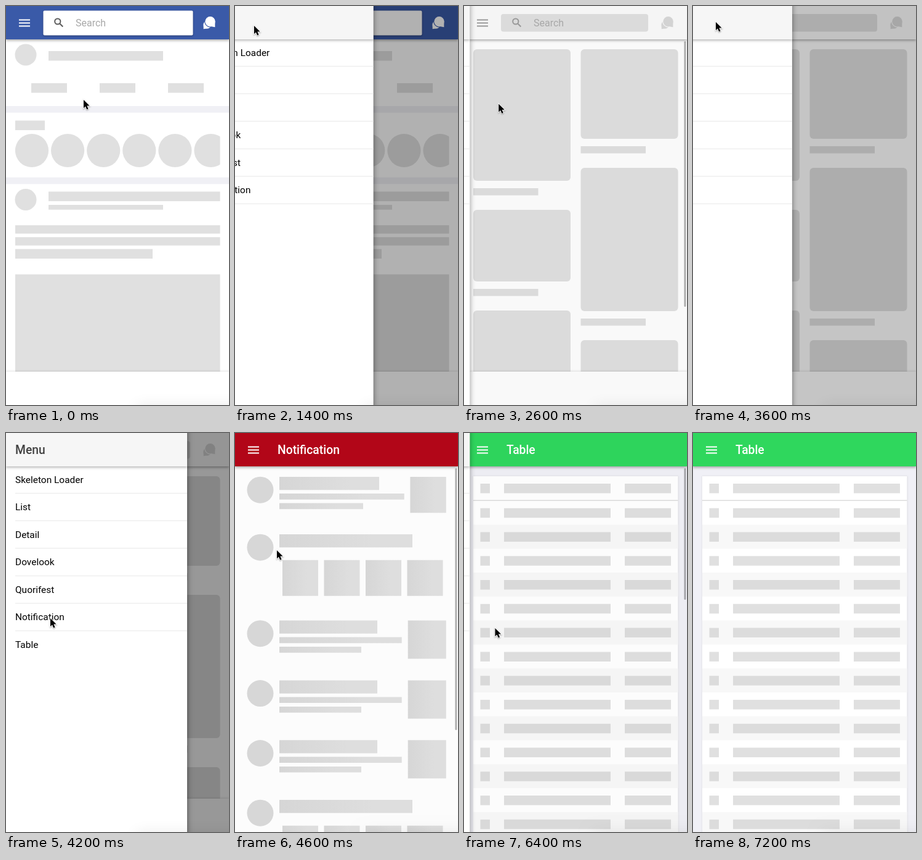
Recreate the animation shown at these times as an HTML page with a canvas. Size 362x646 px, loop 7300 ms.

```html
<!DOCTYPE html>
<html lang="en">
<head>
<meta charset="utf-8">
<title>Skeleton screens</title>
<style>
html, body { margin: 0; width: 100%; height: 100%; overflow: hidden; background: #fff; }
canvas { display: block; width: 362px; height: 646px; }
</style>
</head>
<body>
<canvas id="stage" width="362" height="646"></canvas>
<script>
const W = 362, H = 646, LOOP = 7300, STEP = 100;
const MENU_W = 294, SLIDE = 280, BONE = '#e0e0e0';
const ctx = document.getElementById('stage').getContext('2d');
const items = ['Skeleton Loader', 'List', 'Detail', 'Dovelook', 'Quorifest', 'Notification', 'Table'];

// Menu [opens, closes], and the page shown from a given time
const menuTimes = [[1293, 2350], [3535, 4310], [5320, 6150]];
const pages = [[0, feedPage], [2200, boardPage], [4400, noticePage], [6100, tablePage]];
// Scrollbar [appears, fades, bottom]
const scrollbars = [[2200, 3200, 487], [4400, 5950, 481], [6100, 6800, 270]];
// Pointer [time, x, y]
const track = [
  [0, 126, 152], [200, 160, 345], [400, 315, 210], [550, 240, 8], [800, 23, 40],
  [1000, 31, 32], [1650, 31, 32], [2100, 58, 252], [2200, 59, 250], [2300, 60, 244],
  [2700, 55, 130], [3200, 37, 28], [3600, 37, 26], [3750, 40, 60], [4000, 72, 283],
  [4200, 72, 300], [4400, 72, 300], [4600, 68, 190], [4900, 34, 30], [5500, 34, 30],
  [5800, 70, 307], [5950, 52, 338], [6300, 52, 338], [6700, 46, 250], [6900, 36, 110],
  [7000, 25, 25], [7100, 4, 20], [7200, -20, 20]
];

const clamp = p => Math.min(1, Math.max(0, p));
const easeOut = p => 1 - (1 - clamp(p)) ** 3;
const smooth = p => (p = clamp(p), p * p * (3 - 2 * p));

function rect(x, y, w, h, color = BONE, radius = 0) {
  ctx.fillStyle = color;
  ctx.beginPath();
  ctx.roundRect(x, y, w, h, radius);
  ctx.fill();
}

function circle(x, y, r, color = BONE) {
  ctx.fillStyle = color;
  ctx.beginPath();
  ctx.arc(x, y, r, 0, 7);
  ctx.fill();
}

function text(str, x, y, size, color, weight = 400) {
  ctx.font = `${weight} ${size}px Roboto, sans-serif`;
  ctx.fillStyle = color;
  ctx.fillText(str, x, y);
}

function shadowed(blur, dy, alpha, draw) {
  ctx.save();
  ctx.shadowColor = `rgba(0,0,0,${alpha})`;
  ctx.shadowBlur = blur;
  ctx.shadowOffsetY = dy;
  draw();
  ctx.restore();
}

function header(color, title, iconColor = '#fff') {
  shadowed(4, 2, 0.32, () => rect(0, 0, W, 54, color));
  for (const y of [21.5, 26.5, 31.5]) rect(21, y, 18, 2, iconColor);
  if (title) text(title, 69, 34, 19.3, '#fff', 500);
}

function searchLabel(color) {
  ctx.strokeStyle = color;
  ctx.lineWidth = 2;
  ctx.beginPath();
  ctx.arc(83.8, 25, 4.6, 0, 7);
  ctx.moveTo(87.3, 28.5);
  ctx.lineTo(92.3, 33.5);
  ctx.stroke();
  text('Search', 113, 32.5, 16, '#a9a9a9');
}

function bubble(x, y, r, side, color) {
  circle(x, y, r, color);
  ctx.beginPath();
  ctx.moveTo(x + side * r * 0.95, y + r * 0.2);
  ctx.lineTo(x + side * r * 0.95, y + r * 1.1);
  ctx.lineTo(x + side * r * 0.1, y + r * 0.95);
  ctx.fill();
}

function chatIcon(color, back) {
  bubble(326.5, 30.5, 6.2, -1, color);
  circle(331.5, 25.2, 9.3, back);
  bubble(331.5, 25.2, 8.2, 1, color);
}

function footer(color) {
  shadowed(3, -1, 0.12, () => rect(0, 592, W, 60, color));
}

function feedPage() {
  rect(0, 0, W, H, '#fff');
  circle(32, 79, 17.5);
  rect(69, 73, 186, 15.5);
  for (const x of [41, 152, 263]) rect(x, 125, 58, 15.5);
  for (const y of [162, 277.5]) rect(0, y, W, 10.8, '#f0f0f5');
  rect(15, 185.5, 48, 15.5);
  ctx.save();
  ctx.beginPath();
  ctx.rect(15, 200, 332.5, 70);
  ctx.clip();
  for (let i = 0; i < 6; i++) circle(42 + 58.1 * i, 234, 27.1);
  ctx.restore();
  circle(32, 313.5, 17.5);
  rect(69, 300.5, 278.5, 15.5);
  rect(69, 322, 186, 7.7);
  rect(15, 355, 332.5, 13.5);
  rect(15, 374.3, 332.5, 13.5);
  rect(15, 393.5, 223, 15.5);
  rect(15, 434.5, 332.5, 160);
  footer('#fff');
  header('#3a5aa8');
  shadowed(3, 1, 0.35, () => rect(60.5, 7.5, 243, 40, '#fff', 2));
  searchLabel('#5b5b5b');
  chatIcon('#fff', '#3a5aa8');
}

function boardPage() {
  const bone = '#dedede';
  rect(0, 0, W, H, '#fcfcfc');
  for (const [x, heights] of [[15, [213, 116, 160]], [189.5, [145, 232, 160]]]) {
    let y = 70;
    for (const h of heights) {
      rect(x, y, 158, h, bone, 6);
      rect(x, y + h + 12, 105.5, 11.5, bone);
      y += h + 47;
    }
  }
  footer('#fcfcfc');
  header('#f8f8f8', '', '#9a9a9a');
  rect(60, 13, 239, 28.5, bone, 4);
  searchLabel('#9a9a9a');
  chatIcon('#d6d6d6', '#f8f8f8');
}

function shaded(x, y, w, h) {
  const g = ctx.createLinearGradient(x, 0, x + w, 0);
  g.addColorStop(0, '#d6d6d6');
  g.addColorStop(0.7, '#dedede');
  rect(x, y, w, h, g);
}

function notice(y, size, widths) {
  circle(41, y + 21.2, 21.5, '#d7d7d7');
  shaded(72, y, widths[0], 21.3);
  shaded(72, y + 27, widths[1], 9.7);
  shaded(72, y + 42.6, widths[2], 9.7);
  shaded(342.7 - size, y, size, size);
}

function galleryNotice(y) {
  circle(41, y + 21.2, 21.5, '#d7d7d7');
  shaded(72, y, 216, 21.3);
  for (let i = 0; i < 4; i++) shaded(77 + 67.5 * i, y + 41.8, 58, 58);
}

function noticePage() {
  rect(0, 0, W, H, '#fcfcfc');
  notice(71, 58.3, [162, 202.7, 136]);
  galleryNotice(164);
  for (let i = 0; i < 3; i++) notice(303.5 + 96.9 * i, 62, [159, 198.7, 133]);
  galleryNotice(594);
  header('#b20618', 'Notification');
}

function tablePage() {
  rect(0, 0, W, H, '#f0f0f6');
  shadowed(2, 0, 0.12, () => rect(15, 70, 332.5, H, '#fff'));
  for (let i = 0; i < 15; i++) {
    const y = i ? 121.7 + 38.78 * (i - 1) : 82;
    const even = i && i % 2 === 0;
    if (even) rect(15, y - 12, 332.5, 38.8, '#f8f8f8');
    for (const [x, w] of [[26.5, 15.5], [65, 173], [261, 75]])
      rect(x, y, w, 15.5, even ? '#dcdcdc' : BONE);
  }
  rect(15, 108.5, 332.5, 1.5, '#dcdcdc');
  header('#2fd75d', 'Table');
}

function drawScrollbar(t) {
  for (const [from, fade, bottom] of scrollbars) {
    if (t < from || t > fade + 200) continue;
    ctx.globalAlpha = 1 - clamp((t - fade) / 200);
    rect(357.3, 57, 3, bottom - 57, 'rgba(0,0,0,.3)', 1.5);
    ctx.globalAlpha = 1;
  }
}

function menuOpen(t) {
  for (const [open, close] of menuTimes) {
    if (t < open || t >= close + SLIDE) continue;
    return t < close ? easeOut((t - open) / SLIDE) : 1 - smooth((t - close) / SLIDE);
  }
  return 0;
}

function drawMenu(k) {
  if (k < 0.004) return;
  rect(0, 0, W, H, `rgba(0,0,0,${0.4 * k})`);
  ctx.save();
  ctx.translate(MENU_W * (k - 1), 0);
  shadowed(9, 0, 0.5, () => rect(0, -10, MENU_W, H + 20, '#fff'));
  ctx.beginPath();
  ctx.rect(0, 0, MENU_W, H);
  ctx.clip();
  items.forEach((item, i) => {
    const y = 75 + 44.55 * i;
    text(item, 15, y + 5.5, 15.45, '#000');
    if (i < 6) rect(15, y + 22, MENU_W, 1, '#e8e8e8');
  });
  shadowed(4, 2, 0.28, () => rect(0, 0, MENU_W, 54, '#f6f6f6'));
  text('Menu', 15, 34, 19.3, '#424242', 500);
  ctx.restore();
}

function drawPointer(t) {
  let i = track.findIndex(p => p[0] > t);
  if (i < 0) i = track.length - 1;
  const [t0, x0, y0] = track[i - 1], [t1, x1, y1] = track[i];
  const p = clamp((t - t0) / (t1 - t0));
  ctx.save();
  ctx.translate(x0 + (x1 - x0) * p, y0 + (y1 - y0) * p);
  const arrow = new Path2D('M0 0V13.2L3 10.4L5.2 15.4L7.6 14.4L5.4 9.6H9.6Z');
  ctx.strokeStyle = '#fff';
  ctx.lineWidth = 1.8;
  shadowed(2, 1, 0.35, () => ctx.stroke(arrow));
  ctx.fillStyle = '#000';
  ctx.fill(arrow);
  ctx.restore();
}

function draw(t) {
  pages.findLast(p => p[0] <= t)[1]();
  drawScrollbar(t);
  drawMenu(menuOpen(t));
  // Faint shade along the bottom edge
  shadowed(24, 0, 0.09, () => rect(212, H + 2, 200, 40, '#000'));
  drawPointer(t);
}

const start = performance.now();
function tick() {
  const t = (performance.now() - start) % LOOP;
  draw(Math.floor((t + 8) / STEP) * STEP % LOOP);
  requestAnimationFrame(tick);
}
tick();
</script>
</body>
</html>
```
